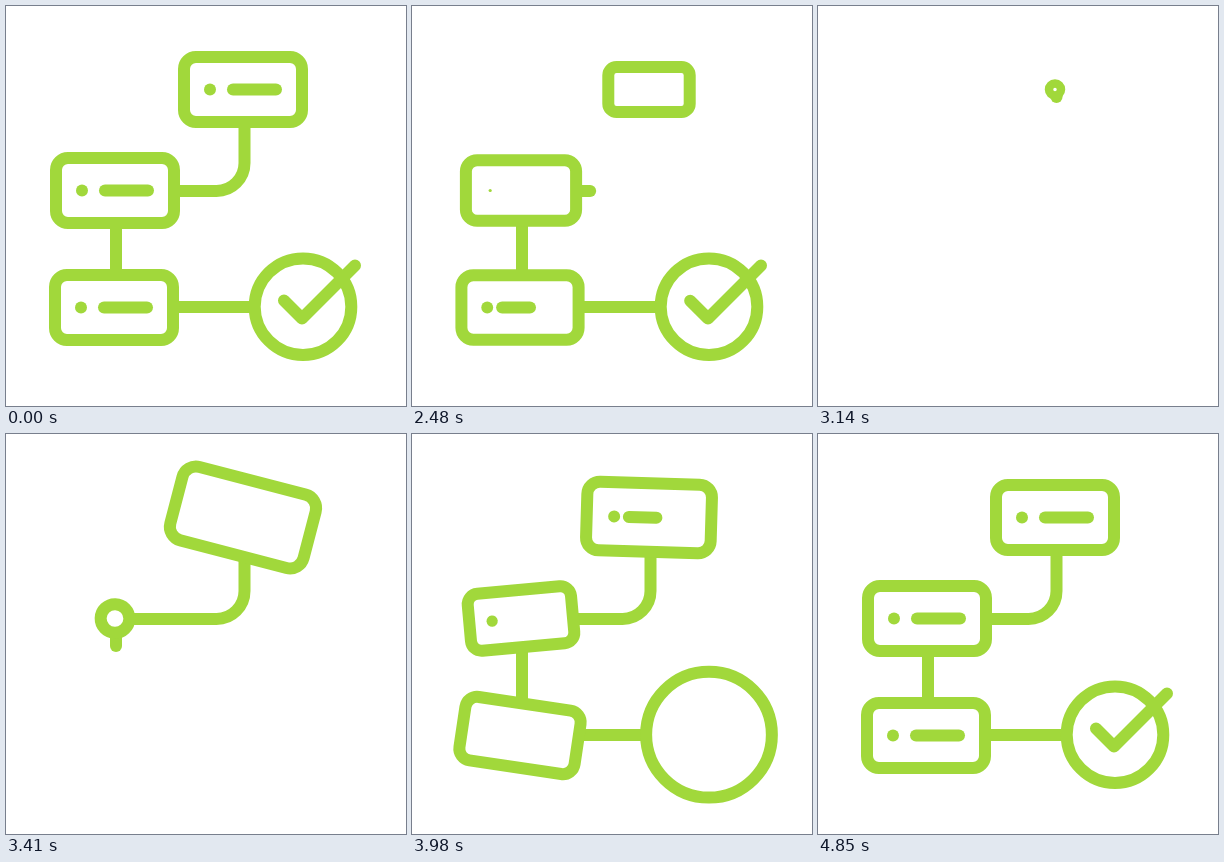
Recreate the animation shown at these times as an HTML page with a canvas. Size 400x400 px, loop 4.91 s.

```html
<!DOCTYPE html>
<html lang="en">
<head>
<meta charset="utf-8">
<title>Workflow steps</title>
<style>
html, body { margin: 0; width: 100%; height: 100%; overflow: hidden; background: #fff; }
canvas { display: block; width: 400px; height: 400px; }
</style>
</head>
<body>
<canvas id="stage"></canvas>
<script>
const LOOP = 4910;
const TURN = 3060; // everything has left by now, and the entrance begins
const GREEN = '#a1d83b';
const canvas = document.getElementById('stage');
const ctx = canvas.getContext('2d');
const ratio = window.devicePixelRatio || 1;
canvas.width = canvas.height = 400 * ratio;

const linear = p => p;
const sine = p => (1 - Math.cos(Math.PI * p)) / 2;
const quadOut = p => 1 - (1 - p) ** 2;
const cubicIn = p => p ** 3;
const quintIn = p => p ** 5;

const ramp = (t, start, span, ease = linear) =>
  ease(Math.min(1, Math.max(0, (t - start) / span)));

// Keys are [time, value, easing towards this key].
function track(t, keys) {
  if (t <= keys[0][0]) return keys[0][1];
  for (let i = 1; i < keys.length; i++) {
    const [t0, v0] = keys[i - 1];
    const [t1, v1, ease = sine] = keys[i];
    if (t < t1) return v0 + (v1 - v0) * ease((t - t0) / (t1 - t0));
  }
  return keys[keys.length - 1][1];
}

const BOX_SCALE = [[3110, 0], [3205, .4, linear], [3425, 1.17, quadOut],
  [3710, .85], [4005, 1.06], [4230, 1]];
const BOX_TURN = [[3200, 0], [3450, 15, quadOut], [3790, -5.2], [4010, 2],
  [4230, .8], [4400, 0]];
const RING_SCALE = [[3700, 0], [4030, 1.375], [4340, .94], [4640, 1.025], [4830, 1]];

const boxes = [
  { x: 237, y: 83.5, bar: 3765 },
  { x: 109, y: 184.5, bar: 4041 },
  { x: 108, y: 301.5, bar: 4270 }
];
const lines = [
  { d: 'M238.5 90V157A28 28 0 0 1 210.5 185H109', len: 212, out: 2130, in: 3140 },
  { d: 'M110 185V301', len: 116, out: 2270, in: 3355 },
  { d: 'M108 301H297', len: 189, out: 2390, in: 3550 }
];
for (const line of lines) line.path = new Path2D(line.d);
const tick = new Path2D('M278 294.5L296 312.5L349 259.5');
const TICK_LEN = 100.4;

function trim(path, len, from, to) {
  if (to - from < .001) return;
  ctx.setLineDash([len * (to - from) + (to === 1 ? 2 : 0), len * 2]);
  ctx.lineDashOffset = -len * from;
  ctx.stroke(path);
  ctx.setLineDash([]);
}

function drawLine(t, { path, len, out, in: enter }) {
  if (t < TURN) trim(path, len, ramp(t, out, 400, cubicIn), 1);
  else trim(path, len, 0, ramp(t, enter, 240));
}

function drawBox(t, { x, y, bar }, i) {
  const leaving = t < TURN;
  const out = t - 120 * i;
  const enter = t - 200 * i;
  const scale = leaving ? 1 - ramp(out, 2030, 570, quintIn) : track(enter, BOX_SCALE);
  if (scale <= .001) return;

  // The outline passes through a small circle before it becomes a rectangle.
  const shape = leaving ? 1 - ramp(out, 2500, 100) : ramp(enter, 3220, 130, sine);
  const w = (65 + 53 * shape) * scale;
  const h = 65 * scale;
  const radius = Math.min(w / 2, h / 2, (32.5 - 20.5 * shape) * scale);

  ctx.save();
  ctx.translate(x, y);
  if (!leaving) ctx.rotate(track(enter, BOX_TURN) * Math.PI / 180);
  ctx.beginPath();
  ctx.roundRect(-w / 2, -h / 2, w, h, radius);
  ctx.fill();
  ctx.stroke();

  const dot = leaving ? 1 - ramp(out, 2230, 200, sine) : ramp(t, bar - 210, 200, quadOut);
  const grow = leaving ? 1 - ramp(out, 2030, 300, cubicIn) : ramp(t, bar, 580, quadOut);
  if (dot > 0) {
    ctx.fillStyle = GREEN;
    ctx.beginPath();
    ctx.arc(-33 * scale, 0, 6 * dot, 0, 7);
    ctx.fill();
  }
  if (grow > 0) {
    ctx.beginPath();
    ctx.moveTo((-33 + 23 * grow) * scale, 0);
    ctx.lineTo((-33 + 66 * grow) * scale, 0);
    ctx.stroke();
  }
  ctx.restore();
}

function drawRing(t) {
  const scale = t < TURN ? 1 - ramp(t, 2400, 580, quintIn) : track(t, RING_SCALE);
  if (scale <= .001) return;
  ctx.beginPath();
  ctx.arc(297, 300.7, 48.3 * scale, 0, 2 * Math.PI);
  ctx.fill();
  ctx.stroke();
}

function drawTick(t) {
  if (t < TURN) trim(tick, TICK_LEN, ramp(t, 2400, 608, cubicIn), 1);
  else trim(tick, TICK_LEN, 0, ramp(t, 4180, 380, quadOut));
}

function draw(t) {
  ctx.setTransform(ratio, 0, 0, ratio, 0, 0);
  ctx.fillStyle = '#fff';
  ctx.fillRect(0, 0, 400, 400);
  ctx.strokeStyle = GREEN;
  ctx.lineWidth = 12;
  ctx.lineCap = ctx.lineJoin = 'round';
  for (const line of lines) drawLine(t, line);
  boxes.forEach((box, i) => drawBox(t, box, i));
  drawRing(t);
  drawTick(t);
}

const start = performance.now();
function frame() {
  draw((performance.now() - start) % LOOP);
  requestAnimationFrame(frame);
}
frame();
</script>
</body>
</html>
```
